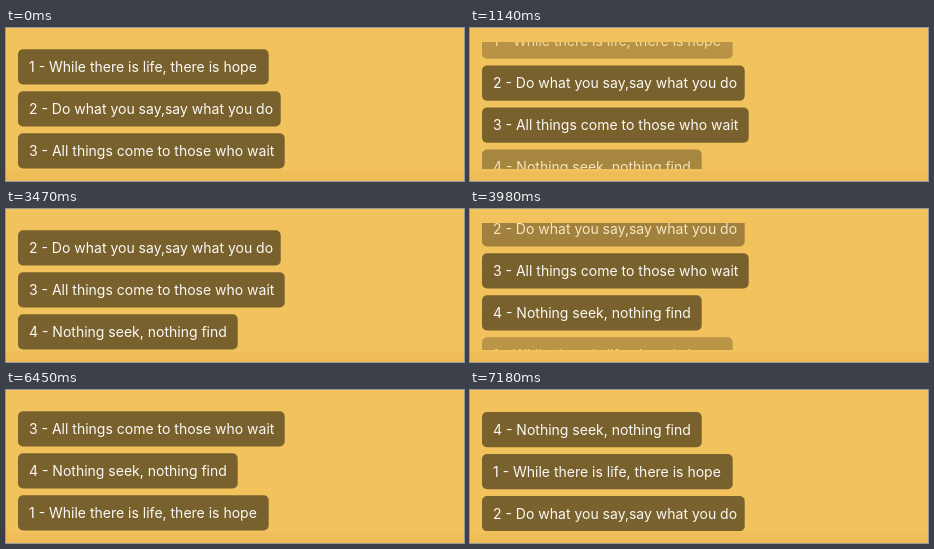
An HTML page that plays this animation: 458 px wide and 153 px high, repeating every 8 s.

```html
<!DOCTYPE html>
<html lang="en">
<head>
<meta charset="utf-8">
<style>
  html, body { margin: 0; width: 100%; height: 100%; overflow: hidden; background: #f2c25c; }
  svg { display: block; width: 458px; height: 153px; }
  text { font: 400 14px Inter, sans-serif; fill: #fbf9f5; }
</style>
</head>
<body>
<svg viewBox="0 0 458 153">
  <defs>
    <linearGradient id="shade" x2="0" y2="1">
      <stop offset="0" stop-color="#f2c25c"/>
      <stop offset="0.35" stop-color="#eebd57"/>
      <stop offset="1" stop-color="#edbc56"/>
    </linearGradient>
    <clipPath id="window"><rect y="14" width="458" height="127"/></clipPath>
  </defs>
  <rect width="458" height="153" fill="#f2c25c"/>
  <rect y="141" width="458" height="12" fill="url(#shade)"/>
  <g id="list" clip-path="url(#window)"></g>
</svg>
<script>
  const LOOP = 8000, STEP = 42, TOP = 21.3, HEIGHT = 35.2, SLIDE = 530;
  const WINDOW_TOP = 14;
  const slideStarts = [815, 3740, 6660];
  const quotes = [
    ["1 - While there is life, there is hope", 250.7],
    ["2 - Do what you say,say what you do", 262.7],
    ["3 - All things come to those who wait", 266.7],
    ["4 - Nothing seek, nothing find", 219.7]
  ];
  const list = document.getElementById("list");

  function add(parent, tag, attrs) {
    const el = document.createElementNS("http://www.w3.org/2000/svg", tag);
    for (const key in attrs) el.setAttribute(key, attrs[key]);
    return parent.appendChild(el);
  }

  const cards = quotes.map(([label, width]) => {
    const card = add(list, "g", {});
    add(card, "rect", { x: 12, width, height: HEIGHT, rx: 5, fill: "#79612e" });
    add(card, "text", { x: 23, y: 22.7 }).textContent = label;
    return card;
  });

  const clamp = v => Math.min(1, Math.max(0, v));

  function draw(time) {
    const scroll = slideStarts.reduce((sum, start) => sum + clamp((time - start) / SLIDE), 0);
    cards.forEach((card, i) => {
      // Slots run from -1 (leaving above) to 3 (entering below).
      const slot = (i - scroll + 1 + 4) % 4 - 1;
      const y = TOP + slot * STEP;
      // A leaving card fades with the part still visible, an entering one with the slide.
      const opacity = slot < 0 ? clamp((y + HEIGHT - WINDOW_TOP) / HEIGHT) : clamp(3 - slot);
      card.setAttribute("transform", `translate(0 ${y})`);
      card.setAttribute("opacity", opacity);
    });
  }

  function tick() {
    draw(performance.now() % LOOP);
    requestAnimationFrame(tick);
  }
  tick();
</script>
</body>
</html>
```
